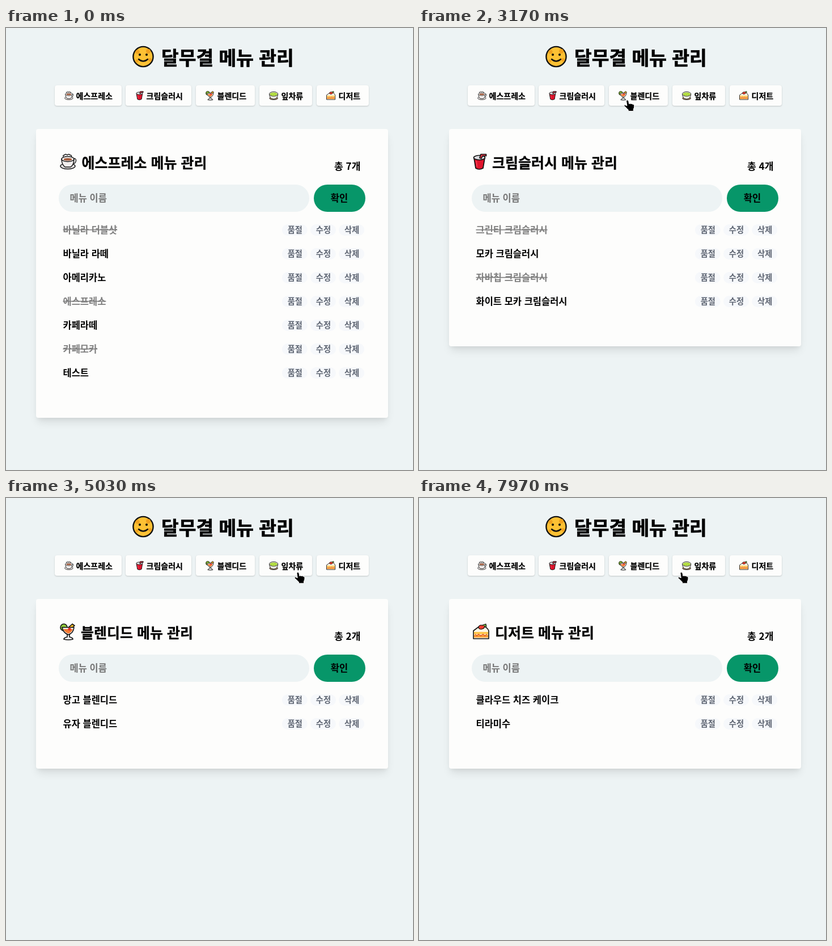
Animation of 718 by 779 pixels, one loop 8 s. Source, as an HTML page:

```html
<!DOCTYPE html>
<html lang="ko">
<head>
<meta charset="utf-8">
<title>메뉴 관리</title>
<style>
html, body { margin: 0; width: 100%; height: 100%; overflow: hidden; background: #edf3f4; }
#stage { position: relative; width: 718px; height: 779px; overflow: hidden; }
#stage > * { position: absolute; }
.tab, #card { background: #fdfdfc; border-radius: 4px; }
.tab { top: 101px; height: 36px; box-shadow: 0 1px 3px rgba(0,0,0,.12), 0 1px 2px rgba(0,0,0,.07); }
#card { left: 53px; top: 178px; width: 621px;
  box-shadow: 0 10px 15px -3px rgba(0,0,0,.1), 0 4px 6px -2px rgba(0,0,0,.05); }
svg { left: 0; top: 0; }
text { font: 700 16.5px "Noto Sans CJK KR", "Noto Sans CJK", "Noto Sans KR", sans-serif; }
.title { font-size: 33.4px; stroke: #000; stroke-width: .7px; }
.nav { font-size: 14px; stroke: #000; stroke-width: .25px; }
.head { font-size: 25px; stroke: #000; stroke-width: .3px; }
.count { font-size: 17.2px; text-anchor: end; }
.hint { fill: #757575; }
.mid { text-anchor: middle; }
.act { font-size: 14.3px; fill: #5f6673; text-anchor: middle; }
.sold { fill: #808080; text-decoration: line-through; }
</style>
</head>
<body>
<div id="stage">
  <div id="card"></div>
  <svg width="718" height="779" viewBox="0 0 718 779">
    <defs>
      <g id="cup" stroke="#111" stroke-width="1.4" stroke-linejoin="round">
        <path d="M23 9q6-1 5.500 4-.5 5-7 6" fill="#fff"/>
        <path d="M7 7q-3-4 1-4 2-3 5 0 3-3 5 0 4 0 2 4z" fill="#fff"/>
        <ellipse cx="14" cy="22.500" rx="13" ry="5" fill="#e2dfdf"/>
        <path d="M3 10q0 9 6 14h10q6-4 6-14z" fill="#f1eeed"/>
        <ellipse cx="14" cy="10" rx="11" ry="4.500" fill="#faf8f7"/>
        <ellipse cx="14" cy="10.500" rx="7.500" ry="2.300" fill="#a45b3c" stroke="none"/>
      </g>
      <g id="soda" stroke="#111" stroke-width="1.7" stroke-linejoin="round">
        <path d="M2 8l3 18q6 4 13 0l3-18z" fill="#e0142c"/>
        <path d="M6 13l1.500 11" stroke="#f0384c" stroke-width="2"/>
        <ellipse cx="11.500" cy="7.500" rx="10" ry="4" fill="#dcdce0"/>
        <path d="M12 8l2-6.500 9.500 0 0 3-6.500 0-2 4.500z" fill="#ee3b4b"/>
      </g>
      <g id="cocktail" stroke="#111" stroke-width="1.6" stroke-linejoin="round">
        <circle cx="7" cy="7" r="6" fill="#8fc93a"/>
        <path d="M13 9l9-8 4 3-8 7" fill="#f5b92b"/>
        <path d="M13 18h4v6q6 1 6 4-8 2-16 0 0-3 6-4z" fill="#e9e9ea"/>
        <path d="M4 7h21q-1 10-10 13Q6 17 4 7z" fill="#f1f1ef"/>
        <path d="M6 10h17q-2 6-8 8-7-3-9-8z" fill="#f47b33" stroke="none"/>
        <circle cx="17" cy="10" r="2.600" fill="#e32f2e" stroke="none"/>
      </g>
      <g id="tea" stroke="#111" stroke-width="1.6" stroke-linejoin="round">
        <ellipse cx="14.500" cy="23" rx="13" ry="4.500" fill="#b98b62"/>
        <path d="M1 10q1 11 7 14 7 3 13 0 6-3 7-14z" fill="#ecece4"/>
        <ellipse cx="14.500" cy="9.500" rx="13.500" ry="7" fill="#f7f7ef"/>
        <ellipse cx="14.500" cy="10" rx="11.500" ry="5.300" fill="#a9d62f" stroke="none"/>
        <path d="M8 9l3 2 3-3 4 4 3-2" fill="none" stroke="#dcef8e" stroke-width="1.200"/>
      </g>
      <g id="cake" stroke="#111" stroke-width="1.6" stroke-linejoin="round">
        <path d="M1 13L13 4q11 0 15 9v14H1z" fill="#fff6e4"/>
        <path d="M2 15h25v4H2z" fill="#ffc64b" stroke="none"/>
        <path d="M2 20h25v5H2z" fill="#f9a03a" stroke="none"/>
        <path d="M4 19l3 3 3-3 4 3 4-3 3 3 4-3" fill="none" stroke="#e2582d" stroke-width="1.300"/>
        <path d="M10 8q0-5 5-5l6 1q0 5-5 6-4 1-6-2z" fill="#ed3d2f" stroke-width="1.200"/>
        <path d="M17 3l6-2 1 5" fill="#66a93a" stroke-width="1.200"/>
      </g>
    </defs>
    <g stroke="#111" stroke-linecap="round">
      <circle cx="242" cy="50.500" r="17.600" fill="#fdc134" stroke-width="2.400"/>
      <g fill="#f2a21f" stroke="none">
        <circle cx="232" cy="42" r="3.600"/><circle cx="251" cy="41" r="4"/>
        <circle cx="254" cy="56" r="3"/><circle cx="231" cy="58" r="2.600"/>
      </g>
      <circle cx="236" cy="47" r="2" stroke="none"/>
      <circle cx="248" cy="47" r="2" stroke="none"/>
      <path d="M234 55q8 7 16 0" fill="none" stroke-width="2.400"/>
    </g>
    <text class="title" x="274" y="64.500">달무결 메뉴 관리</text>
    <g id="nav"></g>
    <g id="head"></g>
    <rect x="93" y="276" width="442" height="48" rx="24" fill="#edf3f4"/>
    <text class="hint" x="112.500" y="306">메뉴 이름</text>
    <rect x="543" y="276" width="91" height="48" rx="24" fill="#079669"/>
    <text class="mid" x="588" y="306">확인</text>
    <g id="list"></g>
    <g id="cursor" stroke="#f6f6f6" stroke-width="1" stroke-linejoin="round">
      <path id="arrow" d="M1 0v16l4-3.600 2.500 5.600 2.600-1.100-2.500-5.500h5.400z"/>
      <path id="hand" d="M4 1.800Q4-.2 6-.2 7.600 0 8 2l.8 4.500Q10.500 5 12 6.500 13.600 5.400 14.800 7 17.600 6.500 18 9.500 18.300 13 16.500 16v3.300H7.500V17Q4.500 14.500 3 12.500L.4 10.500Q-.5 8.500 1.500 8.300L5.200 9.800z"/>
    </g>
  </svg>
</div>
<script>
const $ = id => document.getElementById(id);
const LOOP = 8000;

// name, icon, tab x, tab width, icon x, label x, heading x, items ("-" marks sold out)
const menus = [
  ['에스프레소', 'cup', 86, 118, 103, 123.5, 133.5,
    ['-바닐라 더블샷', '바닐라 라떼', '아메리카노', '-에스프레소', '카페라떼', '-카페모카', '테스트']],
  ['크림슬러시', 'soda', 211, 116, 229, 247.5, 129,
    ['-그린티 크림슬러시', '모카 크림슬러시', '-자바칩 크림슬러시', '화이트 모카 크림슬러시']],
  ['블렌디드', 'cocktail', 335, 104, 352, 372.5, 132, ['망고 블렌디드', '유자 블렌디드']],
  ['잎차류', 'tea', 447, 93, 464, 485.5, 134, ['루이보스', '유자 민트티', '허니 자몽 블랙티']],
  ['디저트', 'cake', 548, 92, 565, 586.5, 134, ['클라우드 치즈 케이크', '티라미수']]
];

// ticks (1/30 s) at which the heading and then the list change
const headTicks = [71, 129, 175, 212];
const listTicks = [71, 130, 176, 213];

// pointer moves: first tick, last tick, end x, end y
const start = [740, 346];
const moves = [
  [28, 34, 145, 110], [37, 41, 238, 132], [89, 96, 369, 127],
  [143, 151, 509, 131], [188, 197, 557, 131], [232, 239, 457, 131]
];

const text = (cls, x, y, s) => `<text class="${cls}" x="${x}" y="${y}">${s}</text>`;
const icon = (id, x, y, k) => `<use href="#${id}" transform="translate(${x} ${y}) scale(${k})"/>`;
const after = (ticks, n) => ticks.filter(k => n >= k).length;
const ease = p => p * p * (3 - 2 * p);

for (const [name, ic, x, w, ix, tx] of menus) {
  const tab = document.createElement('div');
  tab.className = 'tab';
  tab.style.left = x + 'px';
  tab.style.width = w + 'px';
  $('stage').prepend(tab);
  $('nav').innerHTML += icon(ic, ix, 111, .56) + text('nav', tx, 124.5, name);
}

function row(item, i) {
  const y = 356 + 42 * i, sold = item[0] === '-';
  const acts = ['품절', '수정', '삭제'].map((s, k) => {
    const x = 509.8 + 50.2 * k;
    return `<rect x="${x - 23}" y="${y - 10}" width="45" height="20" rx="10" fill="#f6f8fb"/>` +
      text('act', x, y + 5.2, s);
  });
  return text(sold ? 'sold' : '', 100.5, y + 6, sold ? item.slice(1) : item) + acts.join('');
}

let shown = '';
function showMenu(h, l) {
  if (shown === h + ',' + l) return;
  shown = h + ',' + l;
  const [name, ic, , , , , hx] = menus[h], items = menus[l][7];
  $('head').innerHTML = icon(ic, 95, 221, 1) + text('head', hx, 247, name + ' 메뉴 관리') +
    text('count', 625.5, 250, `총 ${items.length}개`);
  $('list').innerHTML = items.map(row).join('');
  $('card').style.height = 215 + 42 * items.length + 'px';
}

function movePointer(n) {
  let [x, y] = start;
  for (const [a, b, ex, ey] of moves) {
    const p = ease(Math.min(1, Math.max(0, (n - a) / (b - a))));
    x += (ex - x) * p;
    y += (ey - y) * p;
  }
  const overTab = y < 138;
  $('cursor').setAttribute('transform', `translate(${x} ${y})`);
  $('cursor').style.display = n < 29 ? 'none' : '';
  $('hand').style.display = overTab ? '' : 'none';
  $('arrow').style.display = overTab ? 'none' : '';
}

const t0 = performance.now();
function draw() {
  const t = (performance.now() - t0) % LOOP;
  const n = Math.floor((t + 4) * .03);
  showMenu(after(headTicks, n), after(listTicks, n));
  movePointer(n);
  requestAnimationFrame(draw);
}
draw();
</script>
</body>
</html>
```
